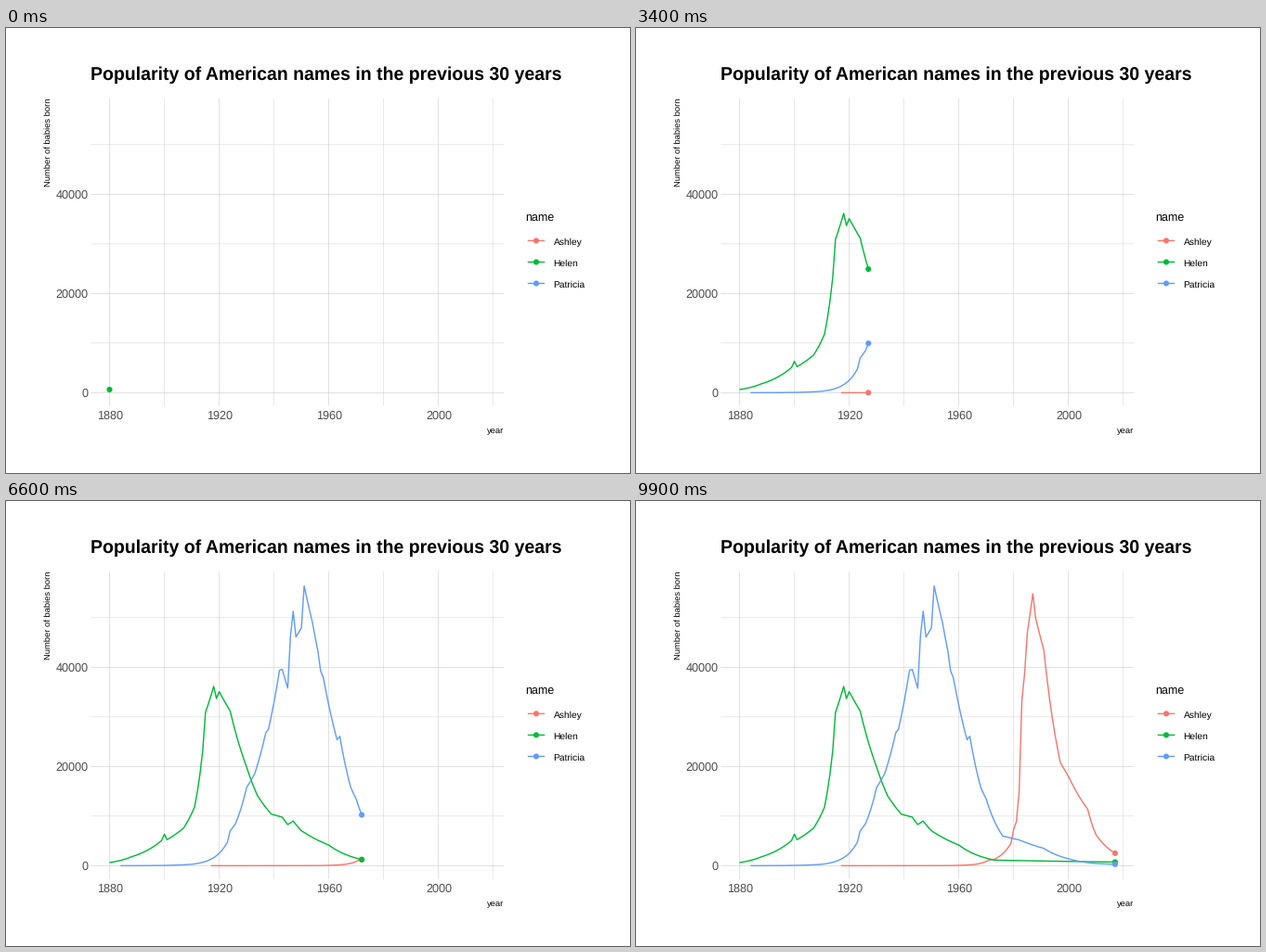
A matplotlib script for the animation above (10000 ms loop, 672 by 480 pixels).

```python
import matplotlib.pyplot as plt
import numpy as np
from matplotlib.animation import FuncAnimation
from matplotlib.patches import Circle

W, H, DPI = 672, 480, 96
PX = 72 / DPI  # points per pixel
FRAMES = 100
FIRST, LAST = 1880, 2017
LEFT, RIGHT, TOP, BOTTOM = 91.4, 536.4, 76, 407.8
GRID, GREY = "#cccccc", "#4d4d4d"

plt.rcParams.update({
    "font.family": "Liberation Sans",
    "text.hinting": "none",
    "path.simplify": False,
})

# Turning points as (year, births in thousands).
SERIES = {
    "Ashley": ("#F8766D", [
        (1917, .005), (1955, .025), (1966, .28), (1971, 1.14), (1973, 1.3),
        (1979, 4.48), (1980, 7.3), (1981, 8.9), (1982, 14.85), (1983, 33.3),
        (1984, 38.8), (1985, 47), (1987, 54.85), (1988, 50), (1991, 43.5),
        (1997, 20.9), (2000, 18), (2007, 11.4), (2010, 6.3), (2017, 2.52)]),
    "Helen": ("#00BA38", [
        (1880, .636), (1888, 1.8), (1899, 5.1), (1900, 6.34), (1901, 5.25),
        (1907, 7.58), (1911, 11.8), (1914, 23.2), (1915, 30.9), (1918, 36.15),
        (1919, 33.7), (1920, 35.1), (1924, 31.2), (1930, 19.9), (1934, 14.1),
        (1939, 10.4), (1943, 9.8), (1945, 8.3), (1947, 9), (1950, 7.06),
        (1960, 4.17), (1973, 1.13), (2017, .74)]),
    "Patricia": ("#619CFF", [
        (1884, .006), (1910, .29), (1920, 2.5), (1923, 4.76), (1924, 7),
        (1926, 8.55), (1930, 15.75), (1933, 18.6), (1937, 26.8), (1938, 27.55),
        (1942, 39.4), (1943, 39.6), (1945, 35.8), (1946, 46.3), (1947, 51.3),
        (1948, 46.1), (1950, 47.95), (1951, 56.4), (1954, 49.1), (1956, 43.3),
        (1957, 39.3), (1958, 37.9), (1963, 25.4), (1964, 26.1), (1968, 15.8),
        (1970, 13.4), (1976, 6), (1982, 5.2), (1991, 3.5), (2000, 1.4),
        (2010, .44), (2017, .29)]),
}


def px_x(year):
    return 111.5 + 2.952 * (year - FIRST)


def px_y(thousands):
    return 393.4 - 5.35 * thousands


def yearly(points):
    """Yearly counts, growing at a constant rate between turning points."""
    keys, values = np.array(points).T
    years = np.arange(int(keys[0]), LAST + 1)
    return years, np.exp(np.interp(years, keys, np.log(values)))


fig = plt.figure(figsize=(W / DPI, H / DPI), dpi=DPI, facecolor="white")
ax = fig.add_axes([0, 0, 1, 1])
ax.set(xlim=(0, W), ylim=(H, 0))
ax.axis("off")


def line(xs, ys, color, width=1.42, z=3):
    return ax.plot(xs, ys, color=color, lw=width * PX, zorder=z, snap=False,
                   solid_capstyle="butt", solid_joinstyle="round")[0]


def dot(x, y, color):
    return ax.add_patch(Circle((x, y), 3.07, fc=color, lw=0, zorder=4))


def label(x, y, s, size, color="black", **kw):
    ax.text(x, y, s, fontsize=size * PX, color=color, va="baseline", **kw)


for i, year in enumerate(range(1880, 2021, 20)):
    x = px_x(year)
    line([x, x], [TOP, BOTTOM], GRID, 0.43 if i % 2 else 0.57, 1)
    if i % 2 == 0:
        label(x + 0.4, 421.9, str(year), 12.6, GREY, ha="center")
for i, thousands in enumerate(range(0, 51, 10)):
    y = px_y(thousands)
    line([LEFT, RIGHT], [y, y], GRID, 0.43 if i % 2 else 0.57, 1)
    if i % 2 == 0:
        label(88.4, y + 4.6, str(thousands * 1000), 12.6, GREY, ha="right")

label(90.6, 56, "Popularity of American names in the previous 30 years", 19.55,
      weight="bold")
label(536.4, 437.6, "year", 9.35, ha="right")
label(47.6, 75.6, "Number of babies born", 9.35, ha="right", rotation=90,
      rotation_mode="anchor")
label(559.6, 208, "name", 12.5)

tracks = []
for row, (name, (color, points)) in enumerate(SERIES.items()):
    y = 229.4 + 23.04 * row
    line([561.8, 580.2], [y, y], color)
    dot(571, y, color)
    label(589.6, y + 4.1, name, 10.2)
    years, counts = yearly(points)
    tracks.append((years, px_x(years), px_y(counts),
                   line([], [], color), dot(0, 0, color)))


def draw(i):
    # Each year appears on the frame nearest to its share of the time span.
    now = FIRST + int((i + 0.5) * (LAST - FIRST) / (FRAMES - 1))
    artists = []
    for years, xs, ys, path, tip in tracks:
        n = np.count_nonzero(years <= now)
        path.set_data(xs[:n], ys[:n])
        tip.set_visible(n > 0)
        tip.center = xs[n - 1], ys[n - 1]
        artists += [path, tip]
    return artists


anim = FuncAnimation(fig, draw, frames=FRAMES, interval=100, repeat=True,
                     repeat_delay=0, blit=False)
plt.show()
```
